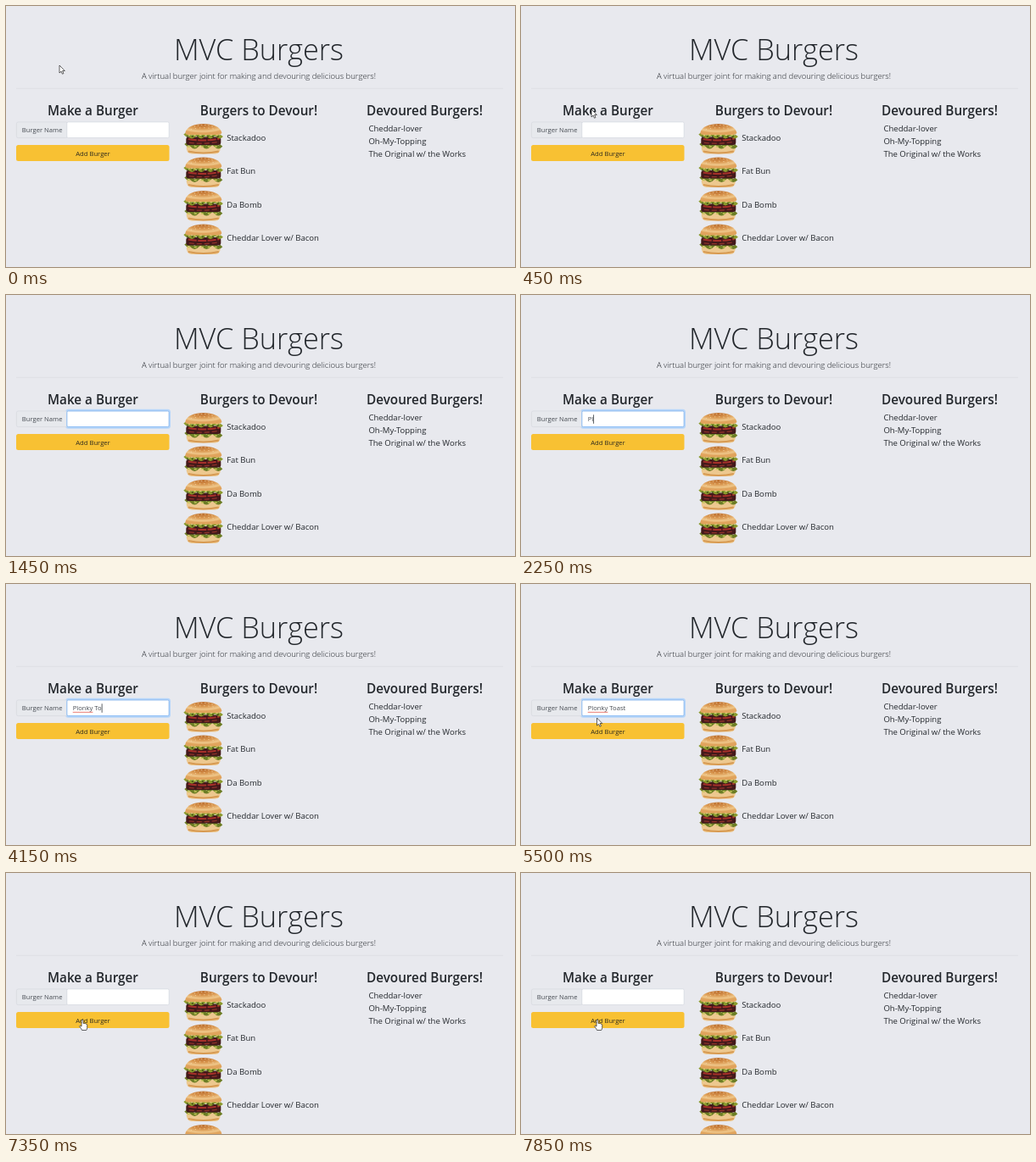
An HTML page that plays this animation: 600x308 px, repeating every 8 s.

```html
<!DOCTYPE html>
<html lang="en">
<head>
<meta charset="utf-8">
<title>MVC Burgers</title>
<style>
  html, body { margin: 0; width: 100%; height: 100%; overflow: hidden; background: #e8e9ee; }
  svg { display: block; width: 100vw; height: 100vh; }
  text { font-family: "Open Sans", "Noto Sans", sans-serif; fill: #23272c; white-space: pre; }
  .mid { text-anchor: middle; }
  .title { font-size: 34.3px; font-weight: 300; }
  .lead { font-size: 9.5px; font-weight: 300; }
  .head { font-size: 15.25px; font-weight: 600; }
  .item { font-size: 9.55px; }
  .form { font-size: 7.65px; fill: #464b52; }
  .add { fill: #2f2b1e; }
</style>
</head>
<body>
<svg viewBox="0 0 600 308">
  <defs>
    <radialGradient id="bun" cx=".48" cy=".1" r=".75">
      <stop offset="0" stop-color="#bd7031"/>
      <stop offset=".45" stop-color="#d9964e"/>
      <stop offset=".8" stop-color="#efc78a"/>
      <stop offset="1" stop-color="#e0a35c"/>
    </radialGradient>
    <g id="burger">
      <path d="M3 26H43Q44 35.500 37 36H9Q2 35.500 3 26Z" fill="#edc88f"/>
      <path d="M5 33Q23 37 41 33" fill="none" stroke="#d79a52" stroke-width="2"/>
      <path d="M2 26q3.500-4 7 0t7 0 7 0 7 0 7 0 7 0" fill="none" stroke="#6c7d25" stroke-width="4"/>
      <path d="M4 27.500H43" stroke="#c3c75a" stroke-width="1.500" stroke-dasharray="3 5"/>
      <rect x="2.500" y="16" width="41" height="9.500" rx="3" fill="#43191a"/>
      <path d="M5 18.500Q23 22 42 18" fill="none" stroke="#a5302a" stroke-width="2" stroke-dasharray="10 1.500"/>
      <path d="M6 23Q23 25 40 22" fill="none" stroke="#8d322b" stroke-width="1.300" stroke-dasharray="6 3"/>
      <path d="M1 14.500q2.750-3 5.500 0t5.500 0 5.500 0 5.500 0 5.500 0 5.500 0 5.500 0 5 0" fill="none" stroke="#8b9a2d" stroke-width="4"/>
      <path d="M3 15.500H43" stroke="#3f4d17" stroke-width="1.500" stroke-dasharray="2 4"/>
      <path d="M5 14H43" stroke="#d9d37c" stroke-width="1.300" stroke-dasharray="2.500 4"/>
      <path d="M1.500 11C3 4 12 .5 23 .5S43 4 44.500 11Q44 13.500 40 13.500H6Q1.500 13.500 1.500 11Z" fill="url(#bun)"/>
      <g fill="none" stroke="#f8dfb0" stroke-width=".8">
        <path d="M12 4Q23 0 34 4" stroke-dasharray="1.200 3"/>
        <path d="M8 7.500Q23 3 38 7.500" stroke-dasharray="1.200 4"/>
      </g>
    </g>
  </defs>

  <rect width="600" height="308" fill="#e8e9ee"/>
  <text class="mid title" x="298" y="63.800">MVC Burgers</text>
  <text class="mid lead" x="298" y="85.600">A virtual burger joint for making and devouring delicious burgers!</text>
  <path d="M12 97.300H586" stroke="#dcdde2" stroke-width=".8"/>
  <text class="mid head" x="102.500" y="129.300">Make a Burger</text>
  <text class="mid head" x="298" y="129.300">Burgers to Devour!</text>
  <text class="mid head" x="493.500" y="129.300">Devoured Burgers!</text>
  <g id="lists"></g>

  <rect id="inputRing" x="70" y="134.700" width="124" height="23" rx="3.500" fill="#b5d5fa"/>
  <rect x="12.400" y="136.900" width="60" height="18.700" rx="2" fill="#e7e9ed" stroke="#d6d9de" stroke-width=".7"/>
  <rect x="71.800" y="136.900" width="120.400" height="18.700" rx="1.500" fill="#fff" stroke="#d3d7de" stroke-width=".7"/>
  <rect id="inputEdge" x="71.800" y="136.900" width="120.400" height="18.700" rx="1.500" fill="none" stroke="#86bcf9" stroke-width=".9"/>
  <text class="form" x="18.800" y="149.300">Burger Name</text>
  <text class="form" id="typed" x="78.700" y="149.300"></text>
  <path id="squiggle" fill="none" stroke="#e2574c" stroke-width=".8"/>
  <rect id="caret" y="141.300" width=".8" height="10.500" fill="#33383e"/>

  <rect id="buttonRing" x="10" y="162" width="184.500" height="23" rx="4" fill="#efd393"/>
  <rect x="12" y="164" width="180.500" height="19" rx="2.500" fill="#f8c133"/>
  <rect id="buttonShade" x="12" y="164" width="180.500" height="19" rx="2.500" fill="#d8a62d"/>
  <text class="mid form add" x="102.500" y="176.600">Add Burger</text>

  <g fill="#fff" stroke="#222" stroke-width=".7" stroke-linejoin="round">
    <path id="arrow" d="M0 0V9L2.100 7.100 3.400 10.200 4.900 9.600 3.600 6.500H6.300Z"/>
    <path id="hand" d="M0 0Q1 -1 2 0V4Q3 3.200 3.800 4.200 4.800 3.700 5.400 4.700 6.600 4.500 6.700 5.800V9Q6.700 10.500 5.700 12H.6Q-.2 10 -2.500 7.400 -2.200 5.800 0 7.500Z"/>
  </g>
</svg>
<script>
const LOOP = 8000, FOCUS = 700, HOVER = 5700, CLICK = 6200, RELOAD = 7350;
const NAME = "Plonky Toast", WORD = NAME.indexOf(" ");
const KEYS = [2050, 2200, 2400, 2600, 2800, 3050, 3250, 3600, 3950, 4250, 4350, 4600];
const TEXT_X = 78.7, ROW = 39.5;

const el = id => document.getElementById(id);
const ramp = (t, from, ms) => Math.min(1, Math.max(0, (t - from) / ms));
const ease = k => k * k * (3 - 2 * k);
const show = (id, amount) => el(id).setAttribute("opacity", +amount);
const place = (id, x, y) => el(id).setAttribute("transform", `translate(${x} ${y})`);
const label = (s, x, y) => `<text class="item" x="${x}" y="${y}">${s}</text>`;

const menu = ["Stackadoo", "Fat Bun", "Da Bomb", "Cheddar Lover w/ Bacon", NAME];
const eaten = ["Cheddar-lover", "Oh-My-Topping", "The Original w/ the Works"];
el("lists").innerHTML =
  menu.map((s, i) => `<g id="row${i}"><use href="#burger" x="209.800" y="${138.4 + i * ROW}"/>` +
    label(s, 260.2, 158.5 + i * ROW) + "</g>").join("") +
  eaten.map((s, i) => label(s, 427.4, 148.4 + i * 14.8)).join("");

function drawInput(t) {
  const count = t < RELOAD ? KEYS.filter(k => k <= t).length : 0;
  const focused = t >= FOCUS && t < CLICK;
  const glow = ramp(t, FOCUS, 150) * (1 - ramp(t, CLICK, 150));
  const typed = el("typed");
  typed.textContent = NAME.slice(0, count);
  show("inputRing", glow);
  show("inputEdge", glow);

  const sinceKey = t - (count ? KEYS[count - 1] : FOCUS);
  const width = count ? typed.getComputedTextLength() : 0;
  el("caret").setAttribute("x", TEXT_X + width);
  show("caret", focused && sinceKey % 1060 < 530);

  const misspelt = focused && count > WORD;
  show("squiggle", misspelt);
  if (misspelt) el("squiggle").setAttribute("d", `M${TEXT_X} 151.300h${typed.getSubStringLength(0, WORD)}`);
}

function drawButton(t) {
  const live = t < RELOAD;
  const hover = ramp(t, HOVER, 150), press = ramp(t, CLICK, 150);
  show("buttonShade", live ? 0.7 * hover + 0.3 * press : 0);
  show("buttonRing", live ? press : 0);
}

// The pointer stays hidden while it rests in the text field.
function drawPointer(t) {
  const go = ease(ramp(t, 50, 600)), down = ramp(t, 5350, 500);
  const leaving = t >= 5400;
  const y = leaving ? 152 + 20 * down : 70 + 70 * go;
  show("arrow", leaving ? t < HOVER : y < 136);
  show("hand", t >= HOVER);
  place("arrow", leaving ? 89.5 : 63 + 27 * go, y);
  place("hand", 89, y + 1.5);
}

function frame() {
  const t = performance.now() % LOOP;
  drawInput(t);
  drawButton(t);
  drawPointer(t);
  show("row4", t >= RELOAD);
  requestAnimationFrame(frame);
}
frame();
</script>
</body>
</html>
```
